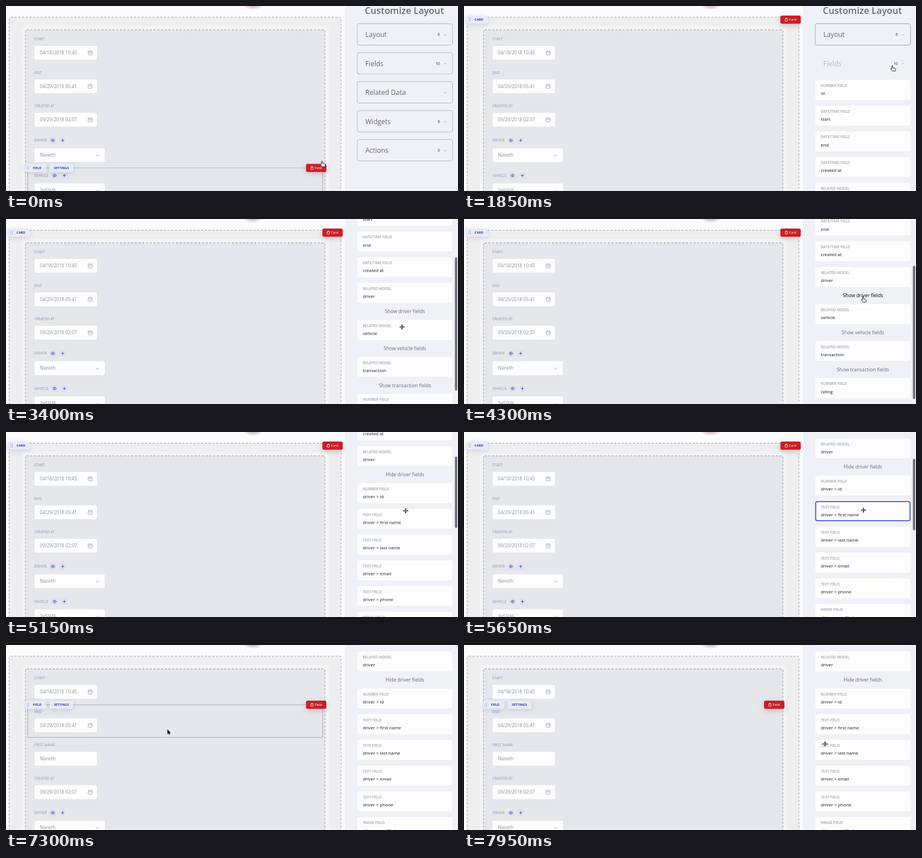
Animation, 800 px wide and 329 px high, one loop 8000 ms. Source, as an HTML page:

```html
<!DOCTYPE html>
<html lang="en">
<head>
<meta charset="utf-8">
<title>Customize Layout</title>
<style>
  html, body { margin: 0; width: 100%; height: 100%; overflow: hidden; background: #fcfbfd; }
  svg { display: block; width: 100vw; height: 100vh; }
  text { font-family: "Open Sans", "Noto Sans", sans-serif; font-weight: 500; white-space: pre; }
  .title { font-size: 16.3px; font-weight: 600; fill: #666c80; text-anchor: middle; }
  .section { font-size: 12px; fill: #62687c; }
  .count { font-size: 6.8px; font-weight: 600; fill: #555b80; text-anchor: end; }
  .kind { font-size: 6.4px; font-weight: 600; fill: #a0a3b1; }
  .name { font-size: 7.9px; fill: #181b24; }
  .toggle { font-size: 8.6px; fill: #666c80; text-anchor: middle; }
  .label { font-size: 6.35px; font-weight: 600; fill: #a6a9b5; }
  .date { font-size: 8.1px; fill: #8c919c; }
  .value { font-size: 8.6px; fill: #8c919c; }
  .chip { font-size: 5.65px; font-weight: 700; fill: #2b3aa6; }
  .delete { font-size: 5.9px; fill: #fff; }
  .line { fill: none; stroke: #9a9eaa; stroke-width: .8; }
  .blue { fill: none; stroke: #3a448f; stroke-width: .9; }
  .frame { fill: none; stroke: #b2b6c8; }
  .hover { fill: none; stroke: #2c42bf; stroke-width: 1.6; }
  .outline { fill: none; stroke: #b3b6bf; stroke-width: 1.2; }
  .soft { filter: drop-shadow(0 2px 4px rgba(50, 60, 130, .16)); }
  .warm { filter: drop-shadow(0 3px 5px rgba(120, 40, 60, .25)); }
  .lifted { filter: drop-shadow(0 5px 9px rgba(40, 45, 80, .2)); }
</style>
</head>
<body>
<svg id="stage" viewBox="0 0 800 329" preserveAspectRatio="none"></svg>
<script>
const LOOP = 8000;
const PITCH = 45.7;   // sidebar card spacing
const ROW = 59.5;     // form field spacing

function add(parent, tag, attrs = {}) {
  const node = document.createElementNS('http://www.w3.org/2000/svg', tag);
  for (const key in attrs) node.setAttribute(key, attrs[key]);
  return parent.appendChild(node);
}
const group = (parent, cls = '') => add(parent, 'g', { class: cls });
const box = (parent, x, y, width, height, attrs) =>
  add(parent, 'rect', { x, y, width, height, ...attrs });
const path = (parent, d, attrs) => add(parent, 'path', { d, ...attrs });
function text(parent, x, y, str, cls) {
  const node = add(parent, 'text', { x, y, class: cls });
  node.textContent = str;
  return node;
}

// rows: [ms, value, easing towards the next row]
function track(node, prop, rows, easing = 'ease-in-out') {
  const frames = rows.map(([ms, value, ease]) =>
    ({ offset: ms / LOOP, [prop]: value, easing: ease || easing }));
  frames.push({ offset: 1, [prop]: rows[rows.length - 1][1] });
  node.animate(frames, { duration: LOOP, iterations: Infinity });
}
const move = (node, rows, easing) =>
  track(node, 'transform', rows.map(([ms, x, y, ease]) => [ms, `translate(${x}px, ${y}px)`, ease]), easing);
// Hard on/off, visible within each [from, to] span.
function show(node, ...spans) {
  const rows = spans.flatMap(([from, to]) => to < LOOP ? [[from, 1], [to, 0]] : [[from, 1]]);
  if (rows[0][0] > 0) rows.unshift([0, 0]);
  track(node, 'opacity', rows, 'step-end');
}

const stage = document.getElementById('stage');

// Form canvas
const glow = add(add(stage, 'defs'), 'radialGradient', { id: 'glow' });
add(glow, 'stop', { offset: .3, 'stop-color': '#c9b9bd' });
add(glow, 'stop', { offset: 1, 'stop-color': '#c9b9bd', 'stop-opacity': 0 });
box(stage, 0, 0, 600, 329, { fill: '#fcfbfd' });
add(stage, 'ellipse', { cx: 437, cy: -3, rx: 19, ry: 10, fill: 'url(#glow)' });
const dashed = { 'stroke-width': 1.3, 'stroke-dasharray': '4 2.6' };
box(stage, 5.5, 20, 587.5, 340, { rx: 3, fill: '#eeeeef', stroke: '#bcbdc3', ...dashed });
box(stage, 28, 36, 543, 320, { rx: 3, fill: '#f4f4f6' });
box(stage, 34.5, 42.5, 530, 320, { rx: 2, fill: '#e6e7eb', stroke: '#b2b4bd', ...dashed });

function calendar(parent, y) {
  box(parent, 145.5, y - 3.3, 7, 6.8, { rx: 1, class: 'line' });
  path(parent, `M145.5 ${y - 1.1}h7M147.3 ${y - 4.5}v1.6M150.8 ${y - 4.5}v1.6M149.5 ${y + 1.4}h1.6`, { class: 'line' });
}
function input(parent, y, label, value, isDate) {
  const g = group(parent);
  text(g, 50, y + 2.3, label, 'label');
  box(g, 50.5, y + 12, 110.5, 24.5, { rx: 3, fill: '#fdfdfe' });
  text(g, 60, y + 27.4, value, isDate ? 'date' : 'value');
  if (isDate) calendar(g, y + 24.5);
  return g;
}
function picker(parent, y, label, value, eyeX) {
  const plusX = eyeX + 17.3;
  text(parent, 50, y + 2.3, label, 'label');
  for (const x of [eyeX, plusX]) box(parent, x - 5.5, y - 5.5, 11, 11, { rx: 2.5, fill: '#dde1f1' });
  path(parent, `M${eyeX - 3.4} ${y}q3.4 -4.6 6.8 0q-3.4 4.6 -6.8 0z`, { class: 'blue' });
  add(parent, 'circle', { cx: eyeX, cy: y, r: .9, fill: '#3a448f' });
  path(parent, `M${plusX - 2.5} ${y}h5M${plusX} ${y - 2.5}v5`, { class: 'blue' });
  box(parent, 50.5, y + 14, 124.5, 24.5, { rx: 3, fill: '#fdfdfe' });
  text(parent, 60, y + 29, value, 'value');
  path(parent, `M159 ${y + 25.2}l3.2 3.2l3.2 -3.2`, { class: 'line' });
}

input(stage, 59, 'START', '04/18/2018 10:45', true);
input(stage, 118.5, 'END', '04/29/2018 05:41', true);
const added = input(stage, 178, 'FIRST NAME', 'Nareth', false);
const lower = group(stage);
input(lower, 178, 'CREATED AT', '09/29/2018 02:07', true);
picker(lower, 239, 'DRIVER', 'Nareth', 83);
picker(lower, 301.5, 'VEHICLE', '3g5946', 86);
track(added, 'opacity', [[0, 0, 'step-end'], [6450, 0], [6600, .42, 'step-end'], [7050, .42], [7200, 1]]);
move(lower, [[0, 0, 0], [6400, 0, 0], [6550, 0, ROW]]);

// Hover handles
function dots(parent, x, y) {
  for (let i = 0; i < 6; i++)
    add(parent, 'circle', { cx: x + i % 2 * 2.7, cy: y - 2.7 + (i >> 1) * 2.7, r: .7, fill: '#8f96b8' });
}
function chip(parent, x, y, width, label, textX) {
  box(parent, x, y - 7.3, width, 14.6, { rx: 3, fill: '#e8ebf8', class: 'soft' });
  text(parent, textX, y + 2.1, label, 'chip');
}
function remove(parent, x, y, label) {
  box(parent, x, y - 7.3, 36, 14.6, { rx: 3, fill: '#c92026', class: 'warm' });
  path(parent, `M${x + 8} ${y - 1.6}h5M${x + 9.6} ${y - 1.8}v-1h1.8v1M${x + 8.6} ${y - 1.4}v4.2h3.8v-4.2`,
    { fill: 'none', stroke: '#fff', 'stroke-width': .7 });
  text(parent, x + 15.3, y + 2.1, label, 'delete');
}
function fieldHandles(y, height) {
  const outline = box(stage, 38.5, y, 522, height, { rx: 2, class: 'outline' });
  const handles = group(stage);
  chip(handles, 34, y, 37, 'FIELD', 47.5);
  dots(handles, 37.5, y);
  chip(handles, 77, y, 42, 'SETTINGS', 84.7);
  remove(handles, 531, y, 'Field');
  return [outline, handles];
}
fieldHandles(288, 62).forEach(node => show(node, [0, 150]));
const [endOutline, endHandles] = fieldHandles(106.3, 58);
show(endOutline, [6450, 7450]);
show(endHandles, [6450, LOOP]);

const cardHandles = group(stage);
chip(cardHandles, 3, 24.2, 39, 'CARD', 18.8);
dots(cardHandles, 8.7, 24.2);
remove(cardHandles, 560, 24.2, 'Card');
show(cardHandles, [150, 6100]);

// Sidebar
box(stage, 600, 0, 200, 329, { fill: '#eff1f6' });
const sidebar = group(stage);

function section(parent, y, label, count) {
  const frame = box(parent, 621.7, y, 168.6, 38, { rx: 3, class: 'frame' });
  const title = text(parent, 636, y + 23.8, label, 'section');
  text(parent, 768, y + 21.8, count, 'count');
  const arrow = path(parent, `M775.7 ${y + 19}l1.8 1.4l1.8 -1.4`, { class: 'line' });
  return { frame, title, arrow };
}
function item(parent, y, kind, name, x = 622) {
  box(parent, x, y, 168, 35.4, { rx: 3, fill: '#fdfdfe' });
  text(parent, x + 9.5, y + 12.4, kind, 'kind');
  text(parent, x + 9.5, y + 26.6, name, 'name');
}
function highlight(parent, y, from, to) {
  show(box(parent, 622.5, y + .7, 167, 34, { rx: 3, class: 'hover' }), [from, to]);
}

text(sidebar, 705, 14.2, 'Customize Layout', 'title');
const layout = section(sidebar, 31.5, 'Layout', '6');
track(layout.frame, 'stroke', [[0, '#b2b6c8'], [900, '#b2b6c8'], [1050, '#9fa3b0']]);
const fields = section(sidebar, 83, 'Fields', '10');
track(fields.frame, 'opacity', [[0, 1], [1250, 1], [1450, 0]]);
track(fields.title, 'opacity', [[0, 1], [1250, 1], [1450, .42]]);
show(fields.arrow, [0, 1300]);
show(path(sidebar, 'M775.7 103.2l1.8 -1.8l1.8 1.8', { class: 'line' }), [1300, LOOP]);

const list = group(sidebar);
const top0 = 131.6;
[['NUMBER FIELD', 'id'], ['DATE/TIME FIELD', 'start'], ['DATE/TIME FIELD', 'end'],
 ['DATE/TIME FIELD', 'created at'], ['RELATED MODEL', 'driver']]
  .forEach(([kind, name], i) => item(list, top0 + i * PITCH, kind, name));
highlight(list, top0, 1950, 2150);
highlight(list, top0 + PITCH, 2150, 3350);

const showDriver = text(list, 706, 368, 'Show driver fields', 'toggle');
const hideDriver = text(list, 706, 368, 'Hide driver fields', 'toggle');
const grey = '#666c80', black = '#08090c';
show(showDriver, [0, 4600]);
show(hideDriver, [4600, LOOP]);
track(showDriver, 'fill', [[0, grey], [3900, black]], 'step-end');
track(hideDriver, 'fill', [[0, black], [4900, grey]], 'step-end');

const driverTop = 380.4;
const driverFields = group(list);
[['NUMBER', 'id'], ['TEXT', 'first name'], ['TEXT', 'last name'], ['TEXT', 'email'],
 ['TEXT', 'phone'], ['IMAGE', 'profile image']]
  .forEach(([kind, name], i) => item(driverFields, driverTop + i * PITCH, kind + ' FIELD', 'driver > ' + name));
show(driverFields, [4600, LOOP]);
highlight(list, driverTop + PITCH, 5300, 6050);

const others = group(list);
['vehicle', 'transaction'].forEach((name, i) => {
  const y = driverTop + i * 65.8;
  item(others, y, 'RELATED MODEL', name);
  text(others, 706, y + 53.8, `Show ${name} fields`, 'toggle');
});
item(others, 512, 'NUMBER FIELD', 'rating');
item(others, 512 + PITCH, 'TEXT FIELD', 'status');
move(others, [[0, 0, 0], [4600, 0, 16 * PITCH]], 'step-end');

// Closed sections cover the list until they slide away.
const closed = group(sidebar);
box(closed, 600, 126, 200, 700, { fill: '#eff1f6' });
section(closed, 134.5, 'Related Data', '');
section(closed, 186, 'Widgets', '6');
section(closed, 237.5, 'Actions', '0');
move(closed, [[0, 0, 0], [1300, 0, 0], [1650, 0, 600]]);

const scroll = [[0, 0], [2600, 0, 'ease-in'], [2950, 143, 'ease-out'], [3300, 188, 'ease-out'],
  [3800, 229], [4800, 229], [5300, 303]];
move(sidebar, scroll.map(([ms, y, ease]) => [ms, 0, -y, ease]));

// Scrollbar: the ratio shrinks once the driver fields open.
function thumb(ratio, rows, from, to) {
  const bar = box(stage, 794.5, 0, 4.2, 443 * ratio, { rx: 2.1, fill: '#6d6f77' });
  move(bar, rows.map(([ms, y, ease]) => [ms, 0, y * ratio - 39.3, ease]));
  track(bar, 'opacity', [[0, 0, 'step-end'], [from, 1, 'step-end'], [to - 150, 1], [to, 0]]);
}
thumb(.535, scroll, 2600, 4600);
thumb(.287, scroll, 4600, 6200);

// Dragged card
const dragged = group(stage);
item(group(dragged, 'lifted'), 0, 'TEXT FIELD', 'driver > first name', 0);
move(dragged, [[0, 622, 123], [6050, 622, 123], [6650, 148, 138.5]]);
show(dragged, [6050, 7050]);

// Pointer
const pointer = group(stage);
const dark = { fill: '#111', stroke: '#fff', 'stroke-width': 1.2, 'paint-order': 'stroke' };
const hand = path(pointer,
  'M-2.8 -4.2a.9 .9 0 0 1 1.8 0V-1l3.8 .7q1.4 .4 1.2 1.8L3.2 4.9H-1.6L-4.6 1.4q-.4 -1.1 .6 -1.2l1.2 .8z',
  { fill: '#fff', stroke: '#22242c', 'stroke-width': .95 });
const cross = path(pointer,
  'M0 -4.6l1.8 1.9H.6V-.6H2.7V-1.8L4.6 0L2.7 1.8V.6H.6V2.7H1.8L0 4.6L-1.8 2.7H-.6V.6H-2.7V1.8L-4.6 0L-2.7 -1.8V-.6H-.6V-2.7H-1.8z', dark);
const arrow = path(pointer, 'M-2 -5V4.2L.1 2.3L1.4 5.2L2.8 4.6L1.6 1.8H4.4z', dark);
show(hand, [0, 150], [900, 1950], [3900, 4900]);
show(cross, [1950, 3900], [4900, 6050], [7750, LOOP]);
show(arrow, [150, 900], [6050, 7750]);
move(pointer, [
  [0, 561, 281], [850, 706, 68], [1200, 760, 111], [1850, 760, 111], [2350, 701, 192],
  [3450, 701, 192], [3900, 708, 143], [4900, 708, 143], [5300, 707, 139], [5700, 707, 139],
  [6050, 700, 136], [6650, 226, 151], [7100, 226, 151], [7850, 639, 176]
]);
</script>
</body>
</html>
```
